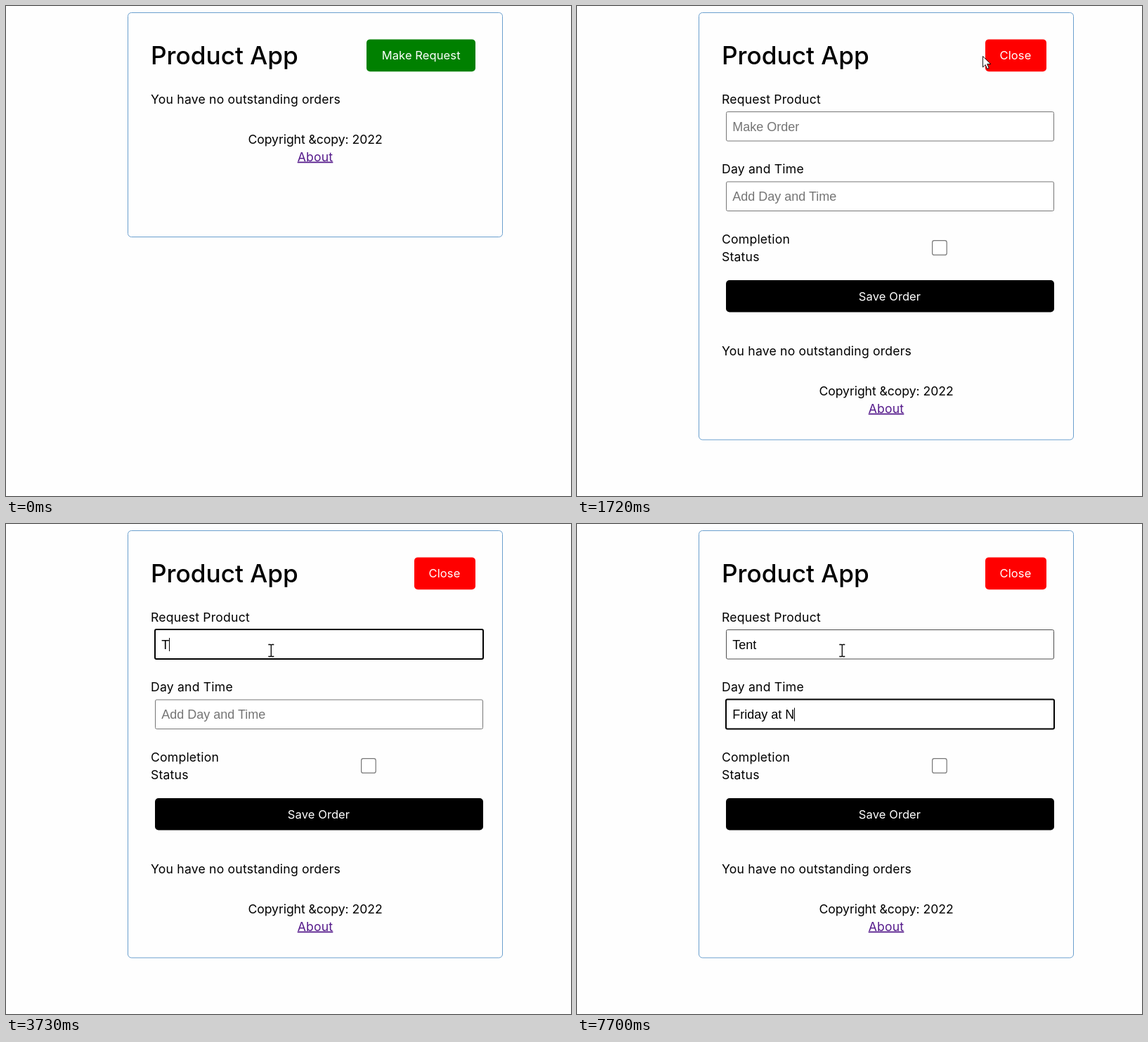
Recreate the animation shown at these times as an HTML page. Size 804 px wide and 697 px high, loop 8 s.

```html
<!DOCTYPE html>
<html lang="en">
<head>
<meta charset="utf-8">
<title>Product App</title>
<style>
  html, body { margin: 0; width: 100%; height: 100%; overflow: hidden; background: #fefefe; }
  svg { display: block; width: 804px; height: 697px; }
  text { font: 400 17.6px Inter, "Open Sans", sans-serif; letter-spacing: .2px; fill: #000; white-space: pre; }
  .title { font-size: 35.2px; font-weight: 550; letter-spacing: 0; }
  .btn { font-size: 16.5px; letter-spacing: .1px; fill: #fff; }
  .mid { text-anchor: middle; }
  .note { letter-spacing: -.05px; }
  .link { fill: #551a8b; text-decoration: underline; text-decoration-thickness: 1px; }
  .field text { font: 18px "Liberation Sans", Arial, sans-serif; letter-spacing: 0; }
  .field rect, .check { fill: #fff; stroke: #767676; }
  .field.hover rect { stroke: #4f4f4f; }
  .field.focus rect { x: 0; y: 0; width: 467px; height: 42px; stroke: #000; stroke-width: 2; }
  .field .hint { fill: #757575; }
  .caret { stroke: #000; }
</style>
</head>
<body>
<svg viewBox="0 0 804 697">
  <rect id="card" x="173.5" y="9.5" width="533" height="319" rx="5" fill="#fefefe" stroke="#6a9fce"/>
  <text class="title" x="206" y="82.5">Product App</text>

  <g id="open">
    <rect x="513" y="47.4" width="155" height="45.8" rx="5" fill="green"/>
    <text class="btn mid" x="590.7" y="76.2">Make Request</text>
  </g>

  <g id="form">
    <rect x="581" y="47.4" width="87" height="45.8" rx="5" fill="red"/>
    <text class="btn mid" x="624" y="76.2">Close</text>
    <text x="206" y="138.5">Request Product</text>
    <g class="field" id="item" transform="translate(212 150)">
      <rect x=".5" y=".5" width="466" height="41.5" rx="2"/>
      <text x="9.3" y="27.5"></text>
      <path class="caret" d="M0 12V31"/>
    </g>
    <text x="206" y="238">Day and Time</text>
    <g class="field" id="when" transform="translate(212 249.5)">
      <rect x=".5" y=".5" width="466" height="41.5" rx="2"/>
      <text x="9.3" y="27.5"></text>
      <path class="caret" d="M0 12V31"/>
    </g>
    <text x="206" y="337.5">Completion</text>
    <text x="206" y="362.5">Status</text>
    <rect class="check" x="505.6" y="333.6" width="20.6" height="20.6" rx="2.8" stroke-width="1.2"/>
    <rect x="212" y="390" width="467" height="45.5" rx="5"/>
    <text class="btn mid" x="445" y="418.5">Save Order</text>
  </g>

  <g id="foot">
    <text x="206" y="138.5">You have no outstanding orders</text>
    <text class="mid note" x="440" y="195.5">Copyright &amp;copy: 2022</text>
    <text class="mid link" x="440" y="220.5">About</text>
  </g>

  <circle id="glow" r="12.5" fill="#ff0" fill-opacity=".5"/>
  <g id="arrow">
    <path d="M.5 .5V16L4.2 12.6L6.7 18.4L9.2 17.3L6.7 11.6H11.8Z" fill="#fff" stroke="#000" stroke-width=".9"/>
  </g>
  <g id="hand">
    <path d="M-1.5 12V1.6C-1.5 -.2 1.3 -.2 1.3 1.6V7C2 6 4 6.3 4.1 7.6C5 6.8 6.8 7.2 6.9 8.5C8 7.9 9.6 8.5 9.6 10V15C9.6 18 8 19 7.8 21H-.3C-.6 18.5 -3.6 15.5 -5 12.8C-5.6 11.2 -3.4 10.2 -2.5 11.2Z" fill="#fff" stroke="#000" stroke-width=".5" stroke-linejoin="round"/>
    <path d="M1.3 7V11.5M4.1 8V11.8M6.9 9V12" stroke="#000" stroke-width=".5"/>
  </g>
  <g id="beam">
    <path d="M-4 -8.5H-1L0 -7.8L1 -8.5H4M0 -8V8M-4 8.5H-1L0 7.8L1 8.5H4" fill="none" stroke="#000" stroke-width="1.3"/>
  </g>
</svg>
<script>
const LOOP = 8000, OPENED = 1720;
const $ = id => document.getElementById(id);

// time, pointer shape, x, y
const pointer = [
  [0, "", 0, 0],
  [260, "arrow", 775, 673], [400, "arrow", 761, 638], [530, "arrow", 725, 555],
  [670, "arrow", 672, 357], [810, "arrow", 638, 256], [930, "arrow", 606, 172],
  [1060, "arrow", 585, 123], [1200, "hand", 580, 88], [1330, "hand", 578, 76],
  [1450, "hand", 577, 71], [1720, "arrow", 577, 71], [1990, "arrow", 537, 96],
  [2130, "beam", 431.5, 172], [2260, "beam", 405, 186], [2390, "arrow", 386, 199],
  [2520, "beam", 379, 186], [2660, "beam", 377.3, 180]
];

// time, text, caret shown
const itemSteps = [
  [0, "", 0], [2790, "", 1], [3320, "", 0], [3730, "T", 1], [4250, "Te", 1],
  [4390, "Ten", 1], [4520, "Tent", 1], [4780, "Tent", 0]
];
const whenSteps = [
  [0, "", 0], [4780, "", 1], [5320, "", 0], [5440, "F", 1], [5710, "Fr", 1],
  [6260, "Fr", 0], [6510, "Frid", 1], [6640, "Frida", 1], [6910, "Friday", 1],
  [7040, "Friday ", 1], [7180, "Friday a", 1], [7450, "Friday at ", 1], [7700, "Friday at N", 1]
];

// time, x, y, end
const clicks = [[1590, 577, 70.5, 1720], [2790, 377.3, 180, 2910]];

const at = (steps, t) => steps.findLast(s => s[0] <= t);
const show = (el, on) => { el.style.display = on ? "" : "none"; };
const place = (el, x, y) => el.setAttribute("transform", `translate(${x} ${y})`);

function drawField(id, steps, hint, t, focus, hover) {
  const [, value, caretOn] = at(steps, t);
  const [, text, caret] = $(id).children;
  $(id).setAttribute("class", "field" + (focus ? " focus" : hover ? " hover" : ""));
  text.setAttribute("class", value ? "" : "hint");
  const content = value || hint;
  if (text.textContent !== content) text.textContent = content;
  const width = value ? text.getComputedTextLength() : 0;
  place(caret, Math.round(9 + width) + .5, 0);
  show(caret, caretOn);
}

function draw(t) {
  const opened = t >= OPENED;
  const [, shape, x, y] = at(pointer, t);
  const click = clicks.find(c => t >= c[0] && t < c[3]);

  $("card").setAttribute("height", opened ? 607.5 : 319);
  show($("open"), !opened);
  show($("form"), opened);
  place($("foot"), 0, opened ? 358 : 0);

  const scale = click ? .98 : 1;
  $("open").setAttribute("transform",
    `translate(590.5 70.25) scale(${scale}) translate(-590.5 -70.25)`);

  if (opened) {
    drawField("item", itemSteps, "Make Order", t, t >= 2790 && t < 4780, shape === "beam");
    drawField("when", whenSteps, "Add Day and Time", t, t >= 4780, false);
  }

  show($("glow"), click);
  if (click) place($("glow"), click[1], click[2]);
  for (const id of ["arrow", "hand", "beam"]) {
    show($(id), id === shape);
    place($(id), x, y);
  }
}

const start = performance.now();
function tick() {
  draw((performance.now() - start) % LOOP);
  requestAnimationFrame(tick);
}
tick();
</script>
</body>
</html>
```
